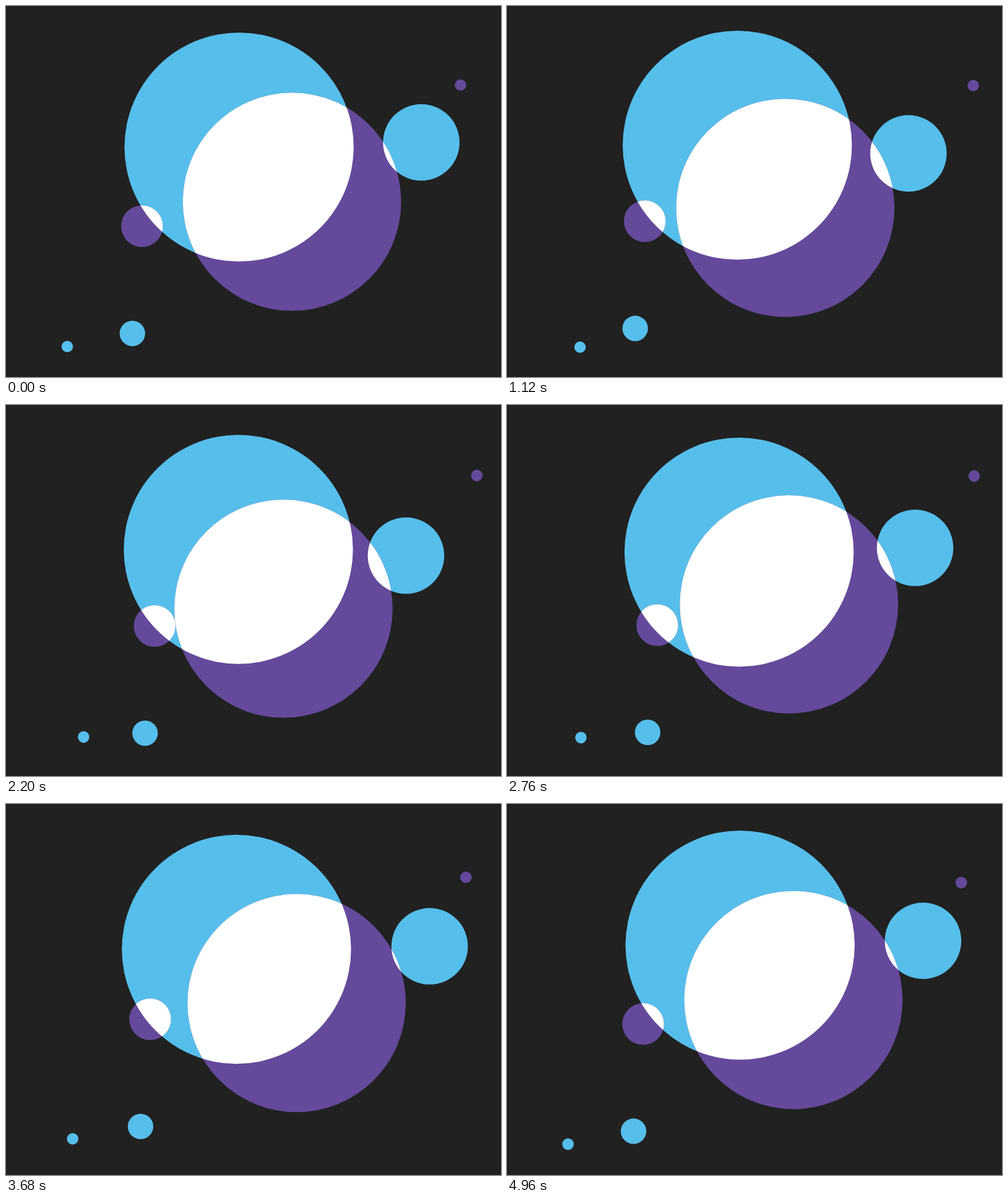
Animation, 800 px wide and 600 px high, one loop 5 s. Source, as an HTML page with a canvas:

```html
<!DOCTYPE html>
<html lang="en">
<head>
<meta charset="utf-8">
<title>Drifting circles</title>
<style>
  html, body { margin: 0; width: 100%; height: 100%; overflow: hidden; background: #212121; }
  canvas { display: block; }
</style>
</head>
<body>
<canvas id="stage" width="800" height="600"></canvas>
<script>
const ctx = document.getElementById('stage').getContext('2d');
const LOOP = 5000, STEP = 40;
const BACK = '#212121', BLUE = '#56beeb', PURPLE = '#65499b', WHITE = '#ffffff';

// Each drift is a closed smooth curve through key points spaced evenly over the loop
const largeDrift = drift(300, [[376.2, 226.9], [372.2, 225.2], [375.3, 231.4],
  [375, 238.1], [372.4, 235.2], [376.3, 230.7]]);
const rightDrift = drift(200, [[666, 218.9], [650.1, 236.7], [642.3, 249.1],
  [658, 231.7], [682.4, 229.5], [686.8, 233.4]]);
const leftDrift = drift(300, [[219, 357.3], [222.8, 348], [237.7, 356.7],
  [242.7, 355.8], [233.5, 348.2], [223.5, 351.3]]);
const tinyDrift = drift(560, [[107, 557.2], [122.4, 547.8], [125.3, 536.7],
  [115.4, 539.4], [105.3, 542.4], [97.4, 547.1]]);

function drift(delay, points) {
  const n = points.length;
  return time => {
    const pos = ((time - delay + LOOP) % LOOP) / LOOP * n;
    const i = Math.floor(pos), u = pos - i, v = 1 - u;
    const [a, b, c, d] = [-1, 0, 1, 2].map(k => points[(i + k + n) % n]);
    const blend = k => b[k] * v * v * (1 + 2 * u) + c[k] * u * u * (3 - 2 * u)
      + u * v * ((c[k] - a[k]) * v - (d[k] - b[k]) * u) / 2;
    return { x: blend(0), y: blend(1) };
  };
}

function discs(list) {
  const shape = new Path2D();
  for (const [x, y, r] of list) {
    shape.moveTo(x + r, y);
    shape.arc(x, y, r, 0, Math.PI * 2);
  }
  return shape;
}

function fill(shape, color) {
  ctx.fillStyle = color;
  ctx.fill(shape);
}

function draw(time) {
  const large = largeDrift(time), right = rightDrift(time);
  const left = leftDrift(time), tiny = tinyDrift(time);

  const blue = discs([
    [large.x, large.y, 185.2],
    [right.x, right.y, 61.8],
    [left.x - 15.5, left.y + 173.4, 20.6],
    [tiny.x, tiny.y, 9.3]
  ]);
  // The large purple disc follows the right-hand one at a smaller scale
  const purple = discs([
    [462.2 + (right.x - 671.2) / 1.8, 316.5 + (right.y - 220.3) / 1.8, 176.4],
    [left.x, left.y, 33.7],
    [tiny.x + 635.6, tiny.y - 423, 9.3]
  ]);

  ctx.fillStyle = BACK;
  ctx.fillRect(0, 0, 800, 600);
  fill(blue, BLUE);
  fill(purple, PURPLE);
  ctx.save();
  ctx.clip(blue);
  fill(purple, WHITE);
  ctx.restore();
}

const start = performance.now();
function tick() {
  const time = (performance.now() - start) % LOOP;
  draw(Math.floor(time / STEP) * STEP);
  requestAnimationFrame(tick);
}
tick();
</script>
</body>
</html>
```
